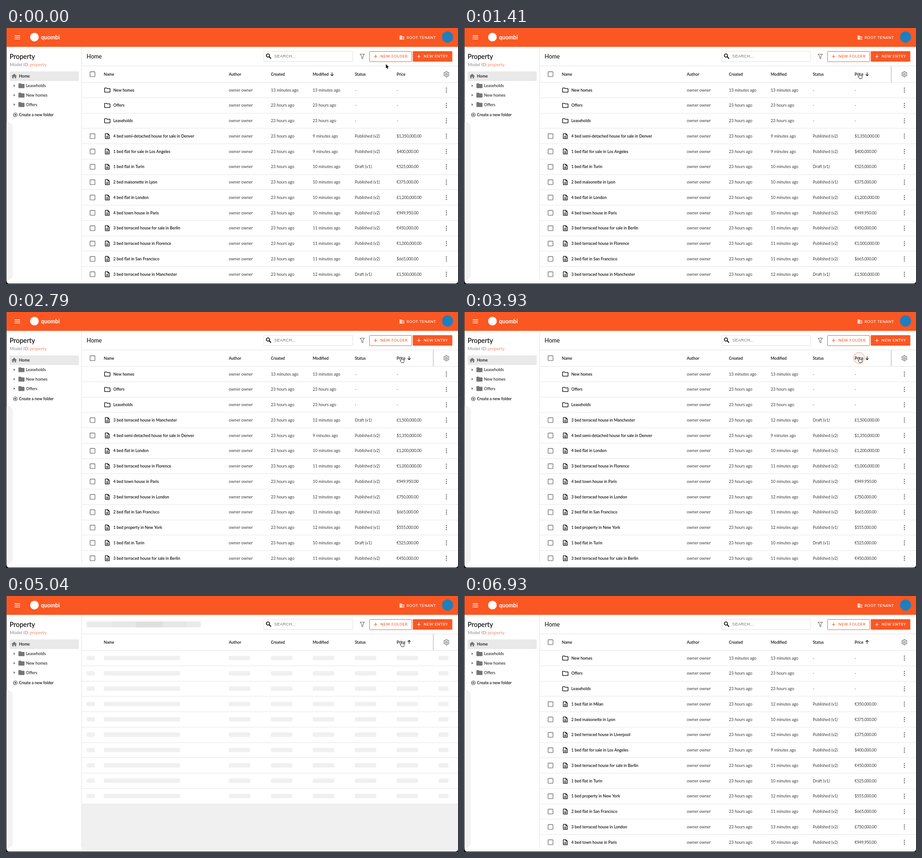
Animation of 994 by 563 pixels, one loop 7.83 s. Source, as an HTML page with a canvas:

```html
<!DOCTYPE html>
<html lang="en">
<head>
<meta charset="utf-8">
<title>Property list</title>
<style>
  html, body { margin: 0; width: 100%; height: 100%; overflow: hidden; background: #000; }
  canvas { display: block; }
</style>
</head>
<body>
<canvas id="stage" width="994" height="563"></canvas>
<script>
const ctx = document.getElementById('stage').getContext('2d');
const LOOP = 7830, ORANGE = '#fa5723', GREY = '#757575';
const FIRST_CLICK = 1140, SECOND_CLICK = 3930;
const LOADING = [[1560, 2760], [4260, 5250]];
const COLUMNS = { Name: 215, Author: 490, Created: 582.5, Modified: 674.5, Status: 767, Price: 859 };

const FOLDER = 'M10 4H4c-1.1 0-1.99.9-1.99 2L2 18c0 1.1.9 2 2 2h16c1.1 0 2-.9 2-2V8c0-1.1-.9-2-2-2h-8l-2-2z';
const ICONS = {
  folder: FOLDER,
  folderOpen: FOLDER + 'M9.17 6l2 2H20v10H4V6z',
  file: 'M8 16h8v2H8zm0-4h8v2H8zm6-10H6c-1.1 0-2 .9-2 2v16c0 1.1.89 2 1.99 2H18c1.1 0 2-.9 2-2V8l-6-6zm4 18H6V4h7v5h5v11z',
  home: 'M10 20v-6h4v6h5v-8h3L12 3 2 12h3v8z',
  add: 'M13 7h-2v4H7v2h4v4h2v-4h4v-2h-4V7zM12 2a10 10 0 1 0 0 20 10 10 0 1 0 0-20zm0 18a8 8 0 1 1 0-16 8 8 0 1 1 0 16z',
  building: 'M12 7V3H2v18h20V7H12zM6 19H4v-2h2v2zm0-4H4v-2h2v2zm0-4H4V9h2v2zm0-4H4V5h2v2zm4 12H8v-2h2v2zm0-4H8v-2h2v2zm0-4H8V9h2v2zm0-4H8V5h2v2zm10 12h-8v-2h2v-2h-2v-2h2v-2h-2V9h8v10zm-2-8h-2v2h2v-2zm0 4h-2v2h2v-2z'
};
for (const key in ICONS) ICONS[key] = new Path2D(ICONS[key]);
const ARROW = new Path2D('M0 0V9L2.1 7.2 3.5 10.4 5 9.8 3.6 6.7H6.4z');
const HAND = new Path2D('M0 1.2Q0 0 1 0T2 1.2V4.2Q3 3.6 3.8 4.5 4.8 4 5.5 5 7 4.7 7 6.2V8.4Q7 10 6 11.5H1.2Q.4 9.6-1.8 7.4-2 6.2-.9 6.3L0 7z');

const folders = [['New homes', '13 minutes ago'], ['Offers', '23 hours ago'], ['Leaseholds', '23 hours ago']];
const entries = [
  ['4 bed semi-detached house for sale in Denver', 9, 'Published (v2)', '$', 1350000],
  ['1 bed flat for sale in Los Angeles', 9, 'Published (v2)', '$', 400000],
  ['1 bed flat in Turin', 10, 'Draft (v1)', '€', 525000],
  ['2 bed maisonette in Lyon', 10, 'Published (v1)', '€', 375000],
  ['4 bed flat in London', 10, 'Published (v2)', '£', 1200000],
  ['4 bed town house in Paris', 10, 'Published (v2)', '€', 949950],
  ['3 bed terraced house for sale in Berlin', 11, 'Published (v2)', '€', 450000],
  ['3 bed terraced house in Florence', 11, 'Published (v2)', '€', 1000000],
  ['2 bed flat in San Francisco', 11, 'Published (v2)', '$', 665000],
  ['3 bed terraced house in Manchester', 12, 'Draft (v1)', '£', 1500000],
  ['3 bed terraced house in London', 12, 'Published (v2)', '£', 750000],
  ['1 bed property in New York', 12, 'Published (v1)', '$', 555000],
  ['1 bed flat in Milan', 12, 'Published (v1)', '€', 350000],
  ['2 bed terraced house in Liverpool', 12, 'Published (v2)', '£', 375000]
];
const descending = [...entries].sort((a, b) => b[4] - a[4]);
// The listing is fetched again, so one entry has aged by a minute.
const ascending = entries
  .map(e => e[4] === 750000 ? [e[0], 13, ...e.slice(2)] : e)
  .sort((a, b) => a[4] - b[4]);

const clamp = v => Math.max(0, Math.min(1, v));
const ease = v => { v = clamp(v); return v * v * (3 - 2 * v); };
const rowY = i => 136.5 + 33.75 * i;

function rect(x, y, w, h, color) {
  ctx.fillStyle = color;
  ctx.fillRect(x, y, w, h);
}
function rounded(x, y, w, h, r, color) {
  ctx.beginPath();
  ctx.roundRect(x, y, w, h, r);
  ctx.fillStyle = color;
  ctx.fill();
}
function outline(x, y, w, h, r, color, width = 1) {
  ctx.beginPath();
  ctx.roundRect(x, y, w, h, r);
  ctx.strokeStyle = color;
  ctx.lineWidth = width;
  ctx.stroke();
}
function disc(x, y, r, color) {
  ctx.beginPath();
  ctx.arc(x, y, r, 0, 7);
  ctx.fillStyle = color;
  ctx.fill();
}
function line(points, color, width) {
  ctx.beginPath();
  for (const [x, y] of points) ctx.lineTo(x, y);
  ctx.strokeStyle = color;
  ctx.lineWidth = width;
  ctx.stroke();
}
function text(str, x, y, { size = 9, weight = 400, color = '#3a3a3a', spacing = 0, family = 'Lato' } = {}) {
  ctx.font = `${weight} ${size}px ${family}, sans-serif`;
  ctx.letterSpacing = spacing + 'px';
  ctx.fillStyle = color;
  ctx.fillText(str, x, y + size * 0.36);
}
const bold = (str, x, y) => text(str, x, y, { size: 8.8, weight: 600, color: '#111' });
const caps = (str, x, y, color) => text(str, x, y, { size: 8.3, weight: 500, color, spacing: 0.6 });
function icon(name, x, y, size, color = '#000') {
  ctx.save();
  ctx.translate(x - size / 2, y - size / 2);
  ctx.scale(size / 24, size / 24);
  ctx.fillStyle = color;
  ctx.fill(ICONS[name], 'evenodd');
  ctx.restore();
}
function plus(x, y, color) {
  line([[x - 3.7, y], [x + 3.7, y]], color, 1.2);
  line([[x, y - 3.7], [x, y + 3.7]], color, 1.2);
}
function checkbox(y) {
  outline(184.9, y - 5.3, 10.7, 10.7, 1, GREY, 1.4);
}

function topBar() {
  rect(1, 0, 993, 41.5, ORANGE);
  for (const y of [17, 20.7, 24.4]) line([[19, y], [31, y]], '#fff', 1.3);
  disc(62.5, 20, 9.5, '#fff');
  text('quombi', 77, 20.3, { size: 12.3, weight: 700, color: '#fff' });
  icon('building', 870.5, 21, 12, '#fff');
  caps('ROOT TENANT', 881, 21, '#fff');
  disc(971, 19.8, 12.2, '#1d7fbf');
}

function sidebar() {
  rounded(-12, 207, 26.5, 347, 12, '#ebebeb');
  rounded(-12, 208, 25.5, 345, 11, '#f3f3f3');
  rect(166, 42, 1, 510, '#e2e2e2');
  text('Property', 8, 62.5, { size: 14.5, weight: 500, color: '#000' });
  text('Model ID: ', 8, 80, { size: 9.85, color: '#8a8a8a' });
  text('property', 52, 80, { size: 9.85, color: '#f9876a' });
  rect(8, 95.5, 152, 21, '#e9e9e9');
  icon('home', 18, 106, 14.6, GREY);
  bold('Home', 28.5, 106);
  ['Leaseholds', 'New homes', 'Offers'].forEach((name, i) => {
    const y = 127 + 20.7 * i;
    ctx.fillStyle = '#666';
    ctx.fill(new Path2D(`M16.8 ${y - 2.8}l3.3 2.8-3.3 2.8z`));
    icon('folder', 34, y, 16, GREY);
    text(name, 44, y, { weight: 500, color: '#222' });
  });
  icon('add', 20.5, 191, 11);
  bold('Create a new folder', 28.5, 191);
}

function toolbar() {
  outline(567, 51, 195.5, 22.5, 1, '#e0e0e0');
  ctx.beginPath();
  ctx.arc(576, 60.5, 3.5, 0, 7);
  ctx.strokeStyle = '#000';
  ctx.lineWidth = 1.7;
  ctx.stroke();
  line([[578.6, 63.1], [582.8, 67.3]], '#000', 2);
  text('SEARCH...', 590, 62, { color: GREY, spacing: 0.25, family: 'Liberation Sans' });
  line([[778.8, 57.5], [788.2, 57.5], [784.9, 62.3], [784.9, 67.4], [782.1, 66], [782.1, 62.3], [778.8, 57.5], [780, 57.5]], '#666', 1.1);
  outline(799.5, 51.5, 92.5, 22.5, 1, ORANGE);
  plus(812.7, 62.5, ORANGE);
  caps('NEW FOLDER', 823.5, 62.5, ORANGE);
  rounded(894.5, 51, 87, 23, 1, ORANGE);
  plus(908, 62.5, '#fff');
  caps('NEW ENTRY', 918.5, 62.5, '#fff');
  rect(167, 83, 827, 1, '#e2e2e2');
}

function gear(x, y) {
  ctx.beginPath();
  for (let a = 0; a < 6.3; a += 0.1) {
    const r = 5.3 + 0.8 * Math.tanh(3 * Math.cos(6 * a));
    ctx.lineTo(x + r * Math.sin(a), y - r * Math.cos(a));
  }
  ctx.closePath();
  ctx.moveTo(x + 2, y);
  ctx.arc(x, y, 2, 0, 7);
  ctx.strokeStyle = '#666';
  ctx.lineWidth = 1.1;
  ctx.stroke();
}

function sortArrow(x, dir) {
  const y = 101.3, tip = y + 3.8 * dir;
  line([[x, y - 3.8 * dir], [x, tip]], '#111', 1.2);
  line([[x - 3.3, tip - 3.3 * dir], [x, tip], [x + 3.3, tip - 3.3 * dir]], '#111', 1.2);
}

function tableHead(t, hovered) {
  for (const name in COLUMNS) bold(name, COLUMNS[name], 101.5);
  if (t < FIRST_CLICK + 120) sortArrow(717, 1);
  else sortArrow(886.5, t < SECOND_CLICK + 120 ? 1 : -1);
  gear(968.5, 101.5);
  if (hovered) rect(938.5, 84, 2.5, 35, '#d9d9d9');
  rect(167, 119, 827, 1, '#e4e4e4');
}

function row(i, name, isFolder, modified, created, status, price) {
  const y = rowY(i);
  if (!isFolder) checkbox(y);
  icon(isFolder ? 'folderOpen' : 'file', 222.8, y, isFolder ? 16 : 15.2);
  bold(name, 236, y);
  text('owner owner', COLUMNS.Author, y);
  text(created, COLUMNS.Created, y);
  text(modified, COLUMNS.Modified, y);
  text(status, COLUMNS.Status, y);
  text(price, COLUMNS.Price, y, { spacing: -0.3 });
  for (const d of [-4.3, 0, 4.3]) disc(968.5, y + d, 1.3, '#666');
  if (i < 12) rect(167, Math.round(y + 16.3), 827, 1, '#e6e6e6');
}

function listing(t) {
  text('Home', 177.3, 62.5, { size: 12.5, color: '#000' });
  checkbox(101.5);
  folders.forEach(([name, age], i) => row(i, name, true, age, age, '-', '-'));
  const list = t < LOADING[0][1] ? entries : t < LOADING[1][1] ? descending : ascending;
  list.slice(0, 10).forEach(([name, minutes, status, sign, price], i) =>
    row(i + 3, name, false, minutes + ' minutes ago', '23 hours ago', status,
      sign + price.toLocaleString('en-US') + '.00'));
}

function skeleton(elapsed) {
  const phase = elapsed / 1500 % 1;
  const glow = 109 + 388 * ease(phase);
  ctx.save();
  ctx.beginPath();
  ctx.roundRect(177.5, 56, 251, 13, 2.5);
  ctx.clip();
  rect(177, 56, 252, 13, '#ebebeb');
  rect(glow - 82, 56, 164, 13, '#e7e7e7');
  rect(glow - 30, 56, 60, 13, '#dfdfdf');
  ctx.restore();

  const fill = Math.max(0.33, Math.min(1, 0.66 + (phase - 0.52) * 1.7));
  const bars = [[177.5, 27], [215, 254], [951, 33]];
  for (const name of ['Author', 'Created', 'Modified', 'Status', 'Price']) bars.push([COLUMNS[name], 71.5]);
  for (let i = 0; i < 10; i++) {
    const y = rowY(i);
    for (const [x, w] of bars) rounded(x, y - 5, w * fill, 9.5, 2.5, '#f0f0f0');
    rect(167, Math.round(y + 16.3), 827, 1, '#e6e6e6');
  }
  rect(167, 458, 827, 104, '#f0f0f0');
}

function pointer(t) {
  const enter = ease((t - 330) / 390), leave = ease((t - 6090) / 330), out = ease((t - 6600) / 330);
  return [835.5 + 33 * enter - 183 * leave - 298 * out, 79.5 + 20.5 * enter + 400 * leave + 66 * out];
}

function ripple(elapsed) {
  if (elapsed < 0 || elapsed > 330) return;
  const k = elapsed / 300;
  ctx.globalAlpha = Math.max(0.05, 1 - k);
  ctx.beginPath();
  ctx.arc(868.8, 101, 12 + 10.5 * k, 0, 7);
  ctx.fillStyle = 'rgba(120,110,105,.07)';
  ctx.fill();
  ctx.strokeStyle = 'rgba(250,150,100,.6)';
  ctx.lineWidth = 1.4;
  ctx.stroke();
  ctx.globalAlpha = 1;
}

function cursor(x, y, isHand) {
  ctx.save();
  ctx.translate(x, y);
  ctx.lineJoin = 'round';
  ctx.lineWidth = isHand ? 0.9 : 1.2;
  ctx.strokeStyle = isHand ? '#111' : '#fff';
  ctx.fillStyle = isHand ? '#fff' : '#000';
  if (isHand) ctx.fill(HAND);
  ctx.stroke(isHand ? HAND : ARROW);
  if (!isHand) ctx.fill(ARROW);
  ctx.restore();
}

function draw() {
  const t = performance.now() % LOOP;
  const [x, y] = pointer(t);
  const hovered = y > 84 && y < 119;
  const loading = LOADING.find(([from, to]) => t >= from && t < to);

  rect(0, 0, 994, 563, '#111');
  ctx.save();
  ctx.beginPath();
  ctx.roundRect(1.2, -10, 992.8, 572, 6);
  ctx.clip();
  rect(0, 0, 994, 563, '#fff');
  rect(1, 558, 993, 5, '#f1f1f1');
  topBar();
  sidebar();
  toolbar();
  tableHead(t, hovered);
  if (loading) skeleton(t - loading[0]);
  else listing(t);
  ripple(t - FIRST_CLICK);
  ripple(t - SECOND_CLICK);
  cursor(x, y, hovered);
  ctx.restore();
  requestAnimationFrame(draw);
}
draw();
</script>
</body>
</html>
```
